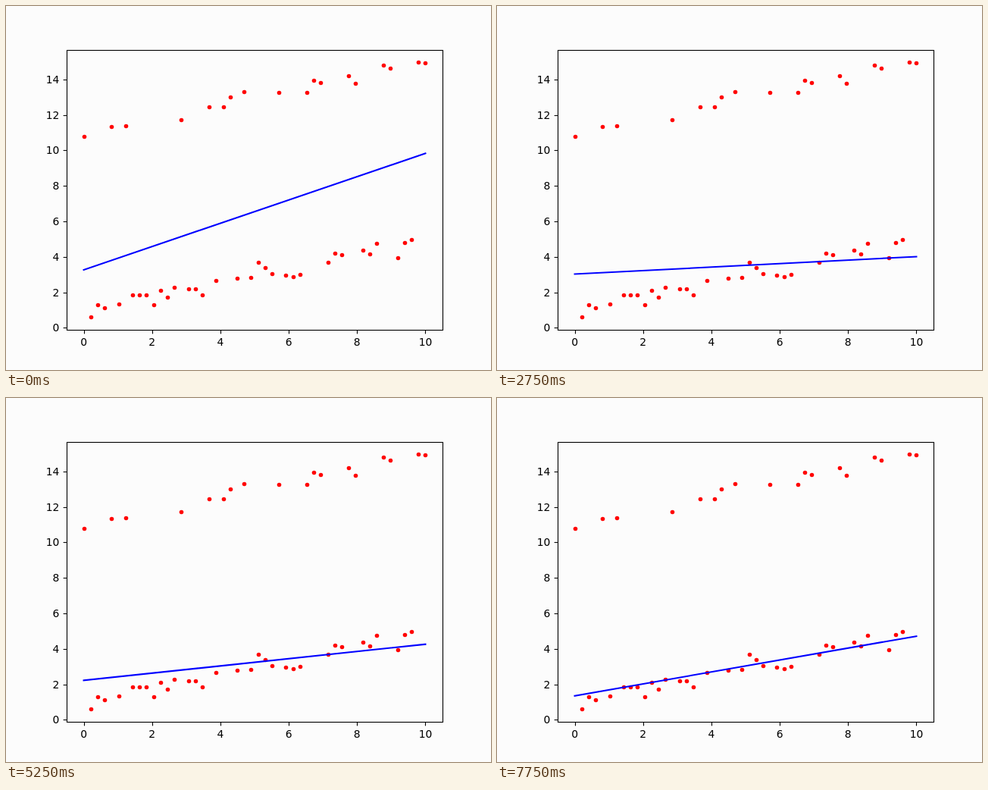
These frames come from a looping animation (640 by 480 pixels, 8 s). An HTML page:

```html
<!DOCTYPE html>
<html lang="en">
<head>
<meta charset="utf-8">
<title>Line fit</title>
<style>
  html, body { margin: 0; width: 100%; height: 100%; overflow: hidden; background: #fcfcfc; }
  svg { display: block; width: 640px; height: 480px; }
  text { font: 13.889px "DejaVu Sans", sans-serif; fill: #000; }
  #axes { fill: none; stroke: #000; stroke-width: 1.11; }
  #points { fill: #f00; }
  #fit {
    fill: none; stroke: #00f; stroke-width: 2.083; stroke-linecap: square;
    d: path("M102.55 347.9L553.45 194.4");
    animation: descend 8s step-end infinite;
  }
  /* each step of the fit holds until the next */
  @keyframes descend {
    0%      { d: path("M102.55 347.9L553.45 194.4"); }
    12.5%   { d: path("M102.55 348.3L553.45 207.9"); }
    21.875% { d: path("M102.55 349.3L553.45 235"); }
    34.375% { d: path("M102.55 353.5L553.45 330.5"); }
    43.75%  { d: path("M102.55 358.7L553.45 329.6"); }
    56.25%  { d: path("M102.55 365.3L553.45 327.7"); }
    65.625% { d: path("M102.55 372.4L553.45 324.7"); }
    78.125% { d: path("M102.55 379.9L553.45 321.3"); }
    87.5%   { d: path("M102.55 386.9L553.45 317.6"); }
    96.875% { d: path("M102.55 392.7L553.45 314.1"); }
  }
</style>
</head>
<body>
<svg viewBox="0 0 640 480">
  <g id="points"></g>
  <path id="fit"/>
  <g id="axes"><rect x="80.5" y="58.5" width="496" height="369"/></g>
  <g id="labels"></g>
</svg>
<script>
  const pointRows = [
    172, 410, 394, 398, 159, 393, 158, 381, 381, 381,
    394, 375, 384, 371, 150, 373, 373, 381, 133, 362,
    133, 120, 359, 113, 358, 338, 345, 353, 114, 355,
    357, 354, 114, 98, 101, 338, 326, 328, 92, 102,
    322, 327, 313, 78, 82, 332, 312, 308, 74, 75
  ];
  const snap = v => Math.floor(v + 0.5) + 0.5;
  const toX = v => 102.545 + 45.091 * v;
  const toY = v => 424.4 - 23.4 * v;

  function add(parentId, tag, attrs, content = "") {
    const node = document.createElementNS("http://www.w3.org/2000/svg", tag);
    for (const key in attrs) node.setAttribute(key, attrs[key]);
    node.textContent = content;
    document.getElementById(parentId).append(node);
  }

  pointRows.forEach((row, i) =>
    add("points", "circle", { cx: snap(toX(i * 10 / 49)), cy: row + 0.5, r: 2.78 }));

  for (let v = 0; v <= 10; v += 2) {
    const x = snap(toX(v));
    add("axes", "path", { d: `M${x} 427.5v4.86` });
    add("labels", "text", { x: toX(v), y: 448, "text-anchor": "middle" }, v);
  }
  for (let v = 0; v <= 14; v += 2) {
    const y = snap(toY(v));
    add("axes", "path", { d: `M80.5 ${y}h-4.86` });
    add("labels", "text", { x: 70.3, y: y + 4.5, "text-anchor": "end" }, v);
  }
</script>
</body>
</html>
```
